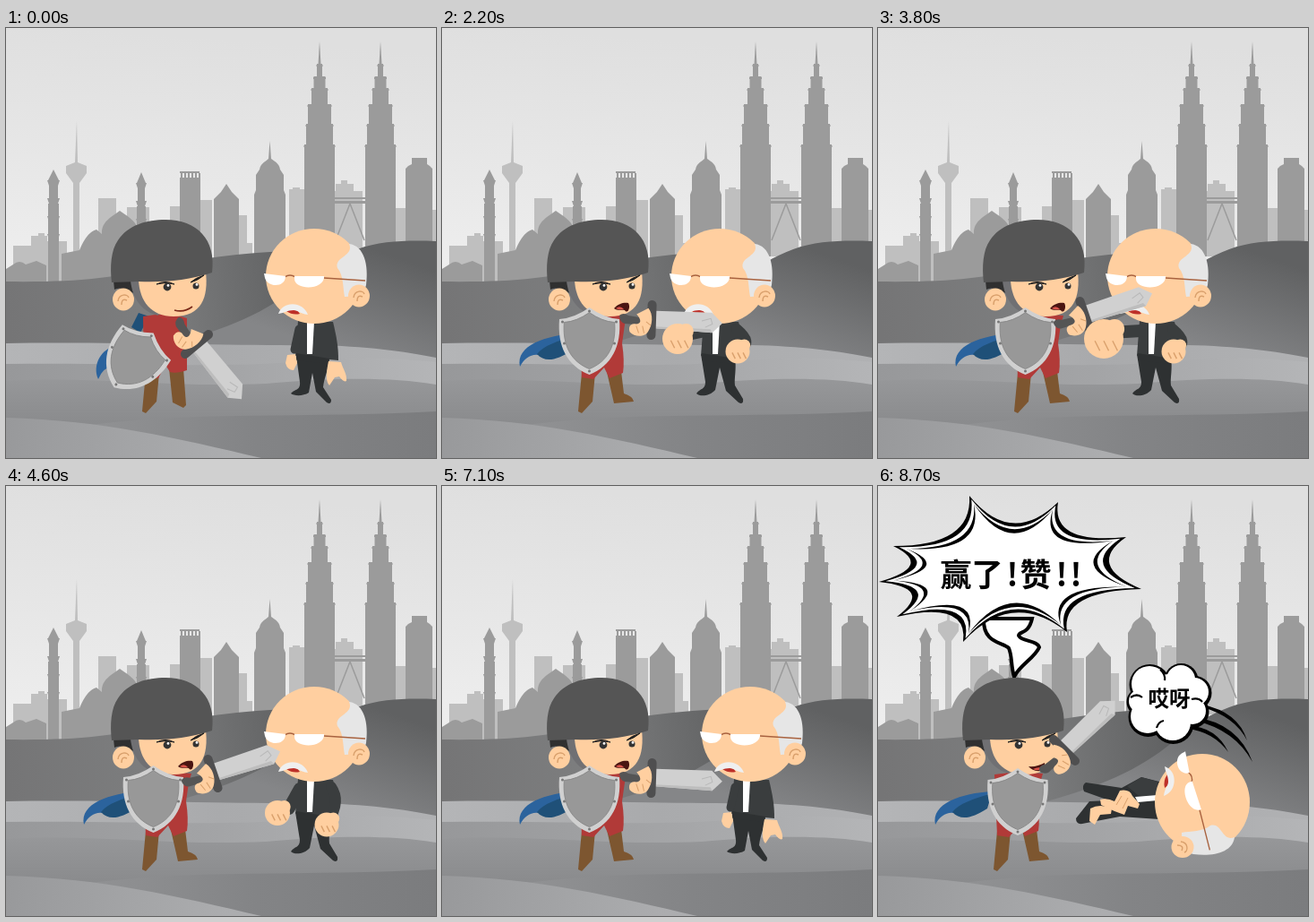
An HTML page with a canvas for the animation above (8900 ms loop, 480 by 480 pixels).

```html
<!DOCTYPE html>
<html lang="zh-CN">
<head>
<meta charset="utf-8">
<title>Duel</title>
<style>
html, body { margin: 0; width: 100%; height: 100%; overflow: hidden; background: #e0e0e0; }
canvas { display: block; width: 480px; height: 480px; }
</style>
</head>
<body>
<canvas id="stage" width="480" height="480"></canvas>
<script>
const ctx = document.getElementById('stage').getContext('2d');
const SKIN = '#ffcfa0', CREASE = '#d9a06c', STEEL = '#d0d0d0', INK = '#2e3132', SUIT = '#3a3d3e';
const LOOP = 8900, LAST = 43;

function shape(d, fill, stroke, width = 1) {
  const path = new Path2D(d);
  if (fill) { ctx.fillStyle = fill; ctx.fill(path); }
  if (stroke) { ctx.strokeStyle = stroke; ctx.lineWidth = width; ctx.stroke(path); }
}
function oval(x, y, rx, ry, fill) {
  ctx.fillStyle = fill;
  ctx.beginPath();
  ctx.ellipse(x, y, rx, ry, 0, 0, 7);
  ctx.fill();
}
function box(x1, y1, x2, y2, fill) {
  ctx.fillStyle = fill;
  ctx.fillRect(x1, y1, x2 - x1, y2 - y1);
}
function ramp(x1, y1, x2, y2, ...colors) {
  const g = ctx.createLinearGradient(x1, y1, x2, y2);
  colors.forEach((c, i) => g.addColorStop(i / (colors.length - 1), c));
  return g;
}
function at(x, y, degrees, draw) {
  ctx.save();
  ctx.translate(x, y);
  ctx.rotate(degrees * Math.PI / 180);
  draw();
  ctx.restore();
}

// Scenery

const FAR = '#bfbfbf', NEAR = '#9b9b9b';

function twinTower(x) {
  shape(`M${x} 15L${x + 1.5} 40H${x - 1.5}Z`, NEAR);
  [[3, 40], [6.5, 54], [9, 67], [13, 85], [15, 107], [17, 130]].forEach(([w, y]) => {
    box(x - w, y, x + w, 255, NEAR);
    box(x - w - 0.5, y + 1, x + w + 0.5, y + 3, NEAR);
  });
}
function minaret(x, top, w) {
  shape(`M${x} ${top}L${x + w - 1} ${top + 12}H${x - w + 1}Z`, NEAR);
  box(x - w + 2, top + 11, x + w - 2, top + 40, NEAR);
  box(x - w + 1, top + 38, x + w - 1, 285, NEAR);
  for (let y = top + 12; y < 245; y += 20)
    shape(`M${x - w} ${y}H${x + w}L${x + w - 2} ${y + 6}H${x - w + 2}Z`, NEAR);
}
function skyline() {
  [[8, 243, 30, 285], [28, 232, 46, 285], [36, 229, 43, 240], [46, 238, 68, 285], [103, 190, 123, 250],
   [135, 200, 160, 250], [183, 199, 196, 250], [216, 192, 230, 260], [259, 209, 269, 260], [268, 240, 275, 260],
   [316, 180, 333, 255], [320, 178, 328, 182], [366, 182, 398, 255], [368, 174, 388, 184], [374, 170, 381, 176],
   [434, 201, 447, 245], [475, 203, 480, 245]].forEach(b => box(...b, FAR));
  shape('M79 104L80 150L90 154V162L82 173V255H75V173L67 162V154L77 150Z', FAR);
  shape('M0 285V269L8 264Q15 258 22 264L34 260L45 265V285Z', NEAR);
  minaret(53, 158, 7);
  minaret(151, 161, 6);
  shape('M62 285V252L82 248Q90 228 101 225L107 230C106 216 118 211 127 204C136 211 149 216 148 232L165 240V285Z', NEAR);
  box(194, 167, 217, 265, NEAR);
  box(194, 160, 216, 162, NEAR);
  for (let x = 195; x < 216; x += 4) box(x, 162, x + 2, 168, NEAR);
  shape('M232 265V191L240 183L246 174L252 183L260 191V265Z', NEAR);
  shape('M277 260V186L279 181V164L283 158C284 151 290 149 293 146L294.5 126L296 146C300 149 305 151 306 158L310 164V181L312 186V260Z', NEAR);
  twinTower(350);
  twinTower(418);
  box(366, 189, 401, 191, NEAR);
  box(366, 193, 401, 196, NEAR);
  shape('M384 196L368 237M384 196L400 237', null, NEAR, 1.5);
  shape('M446 250V157L449 154L453 152V145H470V152L473 154L476 157V250Z', NEAR);
}
function scenery() {
  box(0, 0, 480, 480, ramp(60, 0, 40, 290, '#dfdfdf', '#efefef'));
  skyline();
  shape('M0 283C80 284 120 279 165 268C220 256 270 250 340 248L410 290V360H0Z',
    ramp(0, 300, 330, 262, '#757576', '#7d7e7f', '#5f6061'));
  shape('M175 356C250 335 290 318 330 285C352 266 370 255 392 247C420 237 450 237 480 238V375H175Z',
    ramp(390, 240, 350, 356, '#606162', '#858688'));
  shape('M0 352C110 350 260 355 345 354C400 355 445 361 480 368V480H0Z', ramp(0, 0, 480, 0, '#b4b5b7', '#a9aaac', '#b0b1b3'));
  shape('M0 375C120 373 230 380 320 373C390 366 430 368 480 373V480H0Z', ramp(0, 0, 480, 0, '#97989a', '#a3a4a6', '#b4b5b7'));
  shape('M0 394C100 388 180 402 290 397C370 390 430 390 480 398V480H0Z', ramp(0, 385, 0, 450, '#98999b', '#88898b'));
  shape('M80 445C200 427 340 436 480 428V480H80Z', ramp(80, 0, 480, 0, '#929395', '#838486', '#7b7c7e'));
  shape('M0 435C110 438 190 458 285 480H0Z', ramp(0, 440, 250, 480, '#98999b', '#acadaf'));
}

// Knight: shield and sword are [x, y, angle]

const UPRIGHT = [164.5, 325, 0];
const knightPoses = {
  low:   { dx: 0, shield: [157, 351, 36], sword: [213, 353, 50], mouth: 'line', crouch: true },
  ready: { dx: 0, shield: UPRIGHT, sword: [234, 326, 2], mouth: 'shout' },
  high:  { dx: 0, shield: UPRIGHT, sword: [231, 321, -19], mouth: 'shout' },
  lunge: { dx: 28, shield: [159.5, 340, 0], sword: [229, 348, 44], mouth: 'small' },
  cheer: { dx: 0, shield: UPRIGHT, sword: [231, 295, -45], mouth: 'smile' },
  win:   { dx: -23, shield: [179, 328, 0], sword: [231, 295, -45], mouth: 'smile' }
};
const knightTrack = [[0, 'low'], [3, 'lunge'], [6, 'ready'], [8, 'high'], [10, 'ready'], [13, 'high'], [15, 'ready'],
  [18, 'high'], [21, 'ready'], [23, 'high'], [30, 'ready'], [32, 'high'], [34, 'ready'], [38, 'cheer'], [42, 'win']];

const mouths = {
  line: () => shape('M188 315Q199 318 208 311', null, '#7a2a1a', 1.6),
  small: () => {
    shape('M196 311Q202 306 206 309Q207 314 202 313Q198 314 196 311Z', '#4a1512');
    shape('M198 312Q202 310 205 312Q201 314 198 312Z', '#c84a3c');
  },
  shout: () => {
    shape('M192 313C197 307 204 306 208 307C211 312 207 320 204 315C200 314 196 316 192 313Z', '#4a1512');
    shape('M194 313Q199 309 203 314Q198 315 194 313Z', '#d9534a');
  },
  smile: () => {
    shape('M191 313Q200 314 209 309Q210 316 204 318Q196 319 191 313Z', '#4a1512');
    shape('M196 316Q202 313 207 315Q202 319 196 316Z', '#d9534a');
  }
};
function ear(x, y) {
  oval(x, y, 12, 12.5, SKIN);
  shape(`M${x - 6} ${y + 2}C${x - 5} ${y - 7} ${x + 5} ${y - 6} ${x + 6} ${y - 2}M${x - 2} ${y + 6}Q${x - 2} ${y - 2} ${x + 4} ${y + 1}`, null, CREASE, 1.4);
}
function knightHead(mouth) {
  shape('M120 282H140L147 298L134 292Q126 289 121 292Z', '#303030');
  ear(131, 303);
  shape('M139 282H152L170 321C152 317 141 302 139 282Z', '#707073');
  shape('M148 281L223 272C226 300 219 322 187 322C162 322 149 305 148 281Z', SKIN);
  shape('M118 284C116 267 117 248 125 237C136 220 157 214 178 214C213 214 235 236 230 273C203 282 177 284 148 283Z', '#555');
  shape('M168 286Q178 281 188 286Q178 283 168 286ZM206 284Q211 279 221 276Q214 282 206 284Z', '#222', '#222', 1);
  [[180, 289, 4.4], [212, 288, 3.5]].forEach(([x, y, r]) => {
    oval(x, y, r, r, '#333');
    oval(x + 1, y - 1.6, 1.4, 1.4, '#fff');
  });
  mouths[mouth]();
}
const shieldPath = 'M0 -13Q17 -1 33.5 0C36 30 25 52 0 62C-25 52 -36 30 -33.5 0Q-17 -1 0 -13Z';
function shield() {
  shape(shieldPath, STEEL);
  ctx.save();
  ctx.translate(0, 3.5);
  ctx.scale(0.84, 0.84);
  shape(shieldPath, '#989898', '#858585', 1);
  ctx.restore();
  [[0, -9], [-30, 3], [30, 3], [-28, 27], [28, 27], [0, 58]].forEach(([x, y]) => oval(x, y, 1.5, 1.5, '#777'));
}
function sword() {
  shape('M4 -10.5H67L79 1L68 12L4 9Z', STEEL);
  shape('M4 7L66 8L68 12L4 9Z', '#bdbdbd');
  shape('M56 -1L66 -4L68 2L60 6', null, '#b8b8b8', 1);
  shape('M-36 -4Q-32 -8 -26 -4L-9 -2V6L-30 5Q-36 3 -36 -4Z', '#555');
  ctx.beginPath();
  ctx.roundRect(-5, -22, 10, 44, 5);
  ctx.fillStyle = '#4f4f50';
  ctx.fill();
  ctx.translate(3, 2);
  shape('M-20 -8L-7 -15C-1 -8 -2 4 -6 10C-10 18 -21 18 -27 12C-29 6 -26 2 -21 3C-14 3 -14 -2 -20 -8Z', SKIN);
  shape('M-20 5L-17 13M-13 5L-11 13M-9 0L-4 4', null, CREASE, 1);
}
function knight(p) {
  at(p.dx, 0, 0, () => {
    if (p.crouch) {
      shape('M124 354C106 358 96 376 103 392Q108 379 120 377Z', '#2b639d');
      shape('M148 318L160 322L150 340L140 334Z', '#1f5078');
    } else {
      shape('M150 341C116 343 82 354 87 378C92 369 99 364 107 365L125 358Z', '#2b639d');
      shape('M150 343C128 350 114 354 106 364C115 374 128 371 145 360Z', '#1f5078');
    }
    shape('M156 385H171L168 417L156 430L152 428Z', '#7d5630');
    shape(p.crouch ? 'M182 380H198L201 421L198 424L186 418Z' : 'M184 384L200 383L203 408Q213 411 214 417L192 419Z', '#7d5630');
    shape(p.crouch ? 'M153 322Q180 316 202 324L202 382Q190 386 183 384L178 376L170 391H154Z'
      : 'M153 322Q178 318 207 321L204 331L201 352Q204 372 202 385L187 391L181 379L169 392L156 390Z', '#b13a38');
    knightHead(p.mouth);
    at(...p.shield, shield);
    at(...p.sword, sword);
  });
}

// Elder: hands are [x, y, radius]; a hand without a radius hangs open

const OPEN = [0, 0, 0], RAISED = [364, 361, 13.5];
const elderPoses = {
  idle:  { dx: 0, near: OPEN, far: OPEN, elbow: 371 },
  guard: { dx: 0, near: OPEN, far: RAISED, elbow: 382, wide: true },
  boxer: { dx: 0, near: [303, 365, 14], far: [358, 378, 13.5], elbow: 374, wide: true },
  step:  { dx: -34, near: [303, 358, 14], far: RAISED, elbow: 382, wide: true },
  punch: { dx: -34, near: [297, 347, 17], far: RAISED, elbow: 382, wide: true },
  jab:   { dx: -34, near: [286, 347, 22], far: RAISED, elbow: 382, wide: true }
};
const elderTrack = [[0, 'idle'], [2, 'guard'], [9, 'step'], [10, 'punch'], [13, 'jab'], [15, 'punch'], [17, 'step'],
  [18, 'jab'], [21, 'punch'], [22, 'boxer'], [25, 'punch'], [27, 'boxer'], [31, 'guard'], [33, 'idle']];

function fist(x, y, r) {
  oval(x, y, r, r, SKIN);
  if (r > 12) oval(x + r * 0.55, y - r * 0.5, r * 0.5, r * 0.5, SKIN);
  for (const k of [-0.45, 0, 0.45])
    shape(`M${x + k * r} ${y + r * 0.1}l${r * 0.25} ${r * 0.5}`, null, CREASE, 1.4);
}
// Drawn around the centre of the head.
function elderHead(glassesTilt, glassesSlip) {
  oval(0, 0, 54, 53, SKIN);
  shape('M39 -36C56 -34 61 -12 58 10C56 20 46 23 34 23C32 13 33 -1 26 -9C22 -22 45 -22 39 -36Z', '#e6e6e6');
  ear(50, 22);
  at(-6, 7 + glassesSlip, glassesTilt, () => {
    shape('M17 -5L63 -2M-27 -6Q-21 -10 -15 -6', null, '#a8623f', 1.4);
    shape('M-50 -10L-26 -7C-26 6 -46 6 -49 -5ZM-16 -7H17C18 9 -16 9 -16 -4Z', '#fff');
  });
  shape('M-31 39Q-23 32 -16 42Q-24 44 -31 39Z', '#bd3029');
  shape('M-40 42C-35 27 -12 28 -7 43C-16 42 -18 38 -23 38C-30 38 -33 41 -40 42Z', '#efefef');
}
function elderBody(p) {
  const [nx, ny, nr] = p.near, [fx, fy, fr] = p.far;
  ctx.lineCap = 'round';
  shape(p.wide ? 'M323 364L361 366C363 382 360 390 361 399L370 414Q371 421 365 418L351 405L344 379L339 404C333 411 322 412 318 408C322 402 328 404 328 395Z'
    : 'M324 366L361 368C360 382 355 390 354 401L363 415Q363 421 358 418L346 406L342 385L338 407C332 411 322 411 318 408C322 403 329 405 328 395Z', INK);
  shape('M326 327L323 366L360 370L371 371C371 355 369 345 365 328Z', SUIT);
  shape('M336 328H344L342 364H336Z', '#fff');
  shape('M324 363L361 369L360 375L324 371Z', INK);
  if (fr) shape(`M363 336Q${p.elbow} 352 ${fx + 2} ${fy - 4}`, null, SUIT, 12);
  shape(nr ? `M328 338L${nx + nr * 0.9} ${ny - nr * 0.35}` : 'M327 336L322 359', null, SUIT, nr ? 14 : 9);
  ctx.lineCap = 'butt';
  if (fr) fist(fx, fy, fr);
  else shape('M360 372L374 373C376 381 381 386 380 394Q377 396 372 389L367 390L361 399C356 394 358 382 360 372Z', SKIN);
  at(344, 277, 0, () => elderHead(0, 0));
}
function nearHand(p) {
  if (p.near[2]) fist(...p.near);
  else shape('M314 365L323 364L325 374L321 382Q314 382 312 374Z', SKIN);
}
function elderDown() {
  shape('M314 330L294 325L272 337L232 331Q227 334 230 341L258 351L236 352L221 371Q221 378 228 377L270 369L314 372Z', INK);
  shape('M312 330L294 325L278 335L290 345L312 350Z', SUIT);
  shape('M287 347L312 345V351L290 353Z', '#fff');
  shape('M248 350Q256 348 264 352L270 340Q281 338 284 346L292 355L290 360L279 357L275 367L264 363L249 356Z', SKIN);
  shape('M237 360Q248 354 261 360L260 366L248 367L242 378L236 374Z', SKIN);
  shape('M272 346L266 356M279 348L273 360', null, CREASE, 1);
  at(362, 353, 90, () => elderHead(-18, 6));
}

// Speech bubbles

const CENTER = [148, 93], BAY = 54;
const tips = [[102, 11], [201, 18], [277, 57], [294, 115], [211, 163], [95, 174], [21, 146], [1, 107], [17, 67]];

const mix = (a, b, k) => [a[0] + (b[0] - a[0]) * k, a[1] + (b[1] - a[1]) * k];
function bay(a, b, depth) {
  const mid = mix(a, b, 0.5);
  return mix(mid, CENTER, depth / Math.hypot(mid[0] - CENTER[0], mid[1] - CENTER[1]));
}
function eachSide(points, draw) {
  points.forEach((a, i) => draw(a, points[(i + 1) % points.length]));
}
function burst(points, depth) {
  let d = `M${points[0]}`;
  eachSide(points, (a, b) => { d += `Q${bay(a, b, depth)} ${b}`; });
  return d + 'Z';
}
function words(text, x, y, size) {
  ctx.font = `bold ${size}px "Noto Sans CJK SC", "Noto Sans CJK", sans-serif`;
  ctx.textAlign = 'center';
  ctx.fillStyle = '#000';
  ctx.fillText(text, x, y);
}
function cheerBubble() {
  shape('M118 148C117 176 139 174 146 181C150 190 148 200 152 213C158 200 175 192 180 180C178 172 160 174 157 167C157 162 168 166 172 148Z', '#fff', '#000', 4);
  shape(burst(tips, BAY), '#000');
  shape(burst(tips.map(p => mix(p, CENTER, 0.05)), BAY), '#fff');
  eachSide(tips.map(p => mix(p, CENTER, 0.11)), (a, b) =>
    shape(`M${a}Q${bay(a, b, BAY - 4)} ${b}Q${bay(a, b, BAY + 5)} ${a}`, '#000'));
  [['赢', 87], ['了', 122], ['!', 150], ['赞', 176], ['!', 205], ['!', 221]].forEach(([c, x]) => words(c, x, 112, 35));
}
function groanBubble() {
  shape('M362 244Q402 252 412 284Q398 257 362 247ZM354 258Q402 265 418 308Q398 272 354 262ZM345 267Q378 269 391 297Q374 274 345 271Z', '#000');
  const puffs = [[303, 221, 20], [338, 216, 16], [353, 230, 16], [351, 251, 15], [329, 264, 20], [301, 257, 19], [293, 240, 13], [325, 238, 28]];
  puffs.forEach(([x, y, r]) => oval(x + 0.5, y + 1, r + 3, r + 3, '#000'));
  puffs.forEach(([x, y, r]) => oval(x, y, r, r, '#fff'));
  shape('M282 236Q289 231 295 236M315 205Q321 210 320 217M350 238Q358 236 362 241M311 270Q313 263 319 262', null, '#000', 2.2);
  words('哎呀', 325, 246, 23.5);
}

// Timing

function poseAt(track, poses, step) {
  return poses[track.filter(([from]) => from <= step).pop()[1]];
}
function render(step) {
  const hero = poseAt(knightTrack, knightPoses, step);
  const rival = poseAt(elderTrack, elderPoses, step);
  const down = step >= 38;
  const lean = step === 36 ? 12 : step === 37 ? 48 : 0;
  const standing = draw => at(350 + rival.dx, 415, lean, () => { ctx.translate(-350, -415); draw(rival); });
  scenery();
  if (down) {
    cheerBubble();
    groanBubble();
    elderDown();
  } else standing(elderBody);
  knight(hero);
  if (!down) standing(nearHand);
}
// Steps last 200 ms, except for one of 300 ms that ends at 5900 ms.
function stepAt(t) {
  return t < 5900 ? Math.min(28, Math.floor(t / 200)) : Math.min(LAST, 29 + Math.floor((t - 5900) / 200));
}
let shown = -1, start;
function tick(now) {
  start ??= now;
  const step = stepAt((now - start) % LOOP);
  if (step !== shown) render(shown = step);
  requestAnimationFrame(tick);
}
render(0);
requestAnimationFrame(tick);
</script>
</body>
</html>
```
